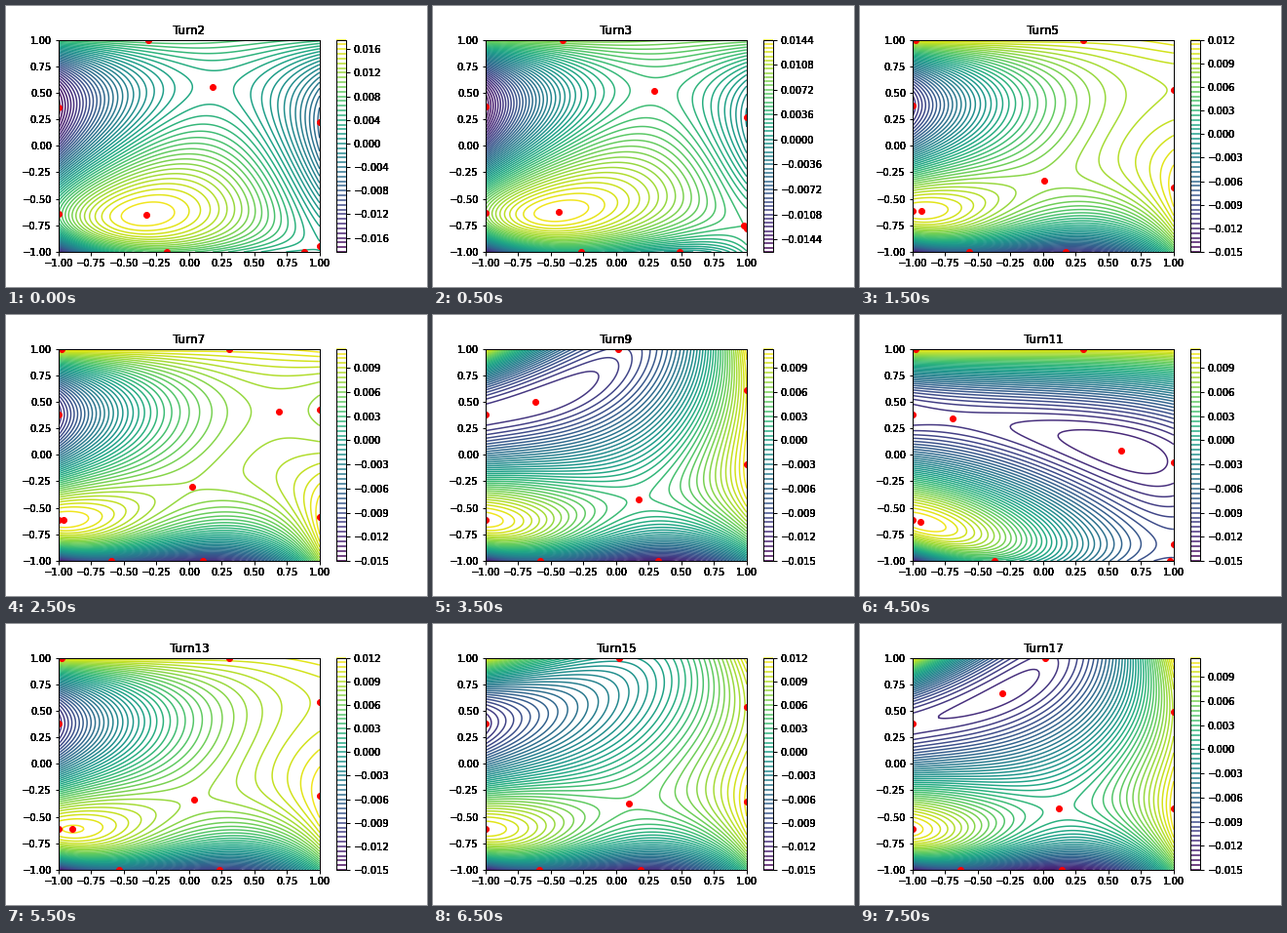
A matplotlib script for the animation above (8 s loop, 432 by 288 pixels).

```python
import numpy as np
import matplotlib.pyplot as plt
from matplotlib.animation import FuncAnimation
from numpy.polynomial import polynomial as P

plt.rcParams.update({
    "font.family": "DejaVu Sans",
    "figure.subplot.bottom": 0.125,
    "axes.linewidth": 1,
    "xtick.major.width": 1,
    "ytick.major.width": 1,
})

# The error of approximating f = A log(x + 2y + C) by a biquadratic.
# Heights are in thousandths; PEAK is the levelled error.
A, C, PEAK = 390, 4.2, 11.3
XN = np.array([-1, 0, 1])
YN = np.array([-0.62, 0.38, 1])
LEFT = (PEAK, -PEAK, PEAK)

# turn: heights at YN along x = -1, 0 and 1
KEYS = {
    2: ((7, -18, 7), (16, 3.7, 8), (1, -6.3, 6)),
    5: (LEFT, (5.3, 4.6, 10.7), (11.1, 9.2, PEAK)),
    7: (LEFT, (4.8, 4.8, 10.7), (11.3, 7, PEAK)),
    9: (LEFT, (2.5, -7.2, -9.7), (7.9, 10.5, PEAK)),
    11: (LEFT, (0, -10.9, 10.7), (-9.4, -8.4, PEAK)),
    13: (LEFT, (5.9, 4.5, 10.7), (10.5, 10, PEAK)),
    17: (LEFT, (1.4, -7.7, -11), (10.8, 8.7, PEAK)),
}
TURNS = list(KEYS)
HEIGHTS = np.array(list(KEYS.values()))

GRID = np.linspace(-1, 1, 121)
X, Y = np.meshgrid(GRID, GRID)
EDGE = np.linspace(-1, 1, 801)


def f(x, y):
    return A * np.log(x + 2 * y + C)


def biquadratic(turn):
    """Coefficients of the approximation that leaves the wanted heights."""
    flat = HEIGHTS.reshape(len(TURNS), -1).T
    heights = np.array([np.interp(turn, TURNS, h) for h in flat]).reshape(3, 3)
    values = f(XN[:, None], YN) - heights
    vx, vy = P.polyvander(XN, 2), P.polyvander(YN, 2)
    return np.linalg.inv(vx) @ values @ np.linalg.inv(vy).T


def error(x, y, q):
    return f(x, y) - P.polyval2d(x, y, q)


def inner_points(q):
    """Stationary points inside the square, by Newton's method."""
    qx, qy = P.polyder(q, axis=0), P.polyder(q, axis=1)
    qxx, qxy, qyy = P.polyder(qx, axis=0), P.polyder(qx, axis=1), P.polyder(qy, axis=1)

    def gradient(x, y):
        s = x + 2 * y + C
        return A / s - P.polyval2d(x, y, qx), 2 * A / s - P.polyval2d(x, y, qy)

    seeds = np.linspace(-0.95, 0.95, 14)
    x, y = (v.ravel() for v in np.meshgrid(seeds, seeds))
    for _ in range(40):
        gx, gy = gradient(x, y)
        bend = A / (x + 2 * y + C) ** 2
        a, b, d = (-k * bend - P.polyval2d(x, y, m)
                   for k, m in ((1, qxx), (2, qxy), (4, qyy)))
        det = a * d - b * b + 1e-9
        x, y = (np.clip(x - (d * gx - b * gy) / det, -1.2, 1.2),
                np.clip(y - (a * gy - b * gx) / det, -1.2, 1.2))
    found = (np.abs(x) < 1) & (np.abs(y) < 1) & (np.hypot(*gradient(x, y)) < 1e-5)
    return set(zip(x[found].round(3), y[found].round(3)))


def turning(values):
    """Places along an edge where the values change direction."""
    step = np.diff(values)
    return EDGE[1:-1][step[:-1] * step[1:] < 0]


def extrema(q):
    points = inner_points(q)
    for s in (-1, 1):
        side = np.full_like(EDGE, s)
        points |= {(s, v) for v in turning(error(side, EDGE, q))}
        points |= {(v, s) for v in turning(error(EDGE, side, q))}
    return sorted(points)


def darken(label):
    """Overprint a label so its soft edges turn almost black."""
    draw = label.draw

    def overprint(renderer):
        for _ in range(8):
            draw(renderer)
    label.draw = overprint


fig = plt.figure(figsize=(6, 4), dpi=72, facecolor="white")


def update(frame):
    turn = frame + 2
    q = biquadratic(turn)

    fig.clear()
    ax = fig.add_subplot()
    lines = ax.contour(X, Y, error(X, Y, q) / 1000, 50, cmap="viridis")
    bar = fig.colorbar(lines, ax=ax)
    ax.scatter(*np.transpose(extrema(q)), c="red", zorder=2.2)
    ticks = np.linspace(-1, 1, 9)
    ax.set(xlim=(-1, 1), ylim=(-1, 1), xticks=ticks, yticks=ticks)
    title = ax.set_title(f"Turn{turn}")
    for label in [title, *ax.get_xticklabels(), *ax.get_yticklabels(),
                  *bar.ax.get_yticklabels()]:
        darken(label)


anim = FuncAnimation(fig, update, frames=16, interval=500,
                     repeat=True, repeat_delay=0)
plt.show()
```
